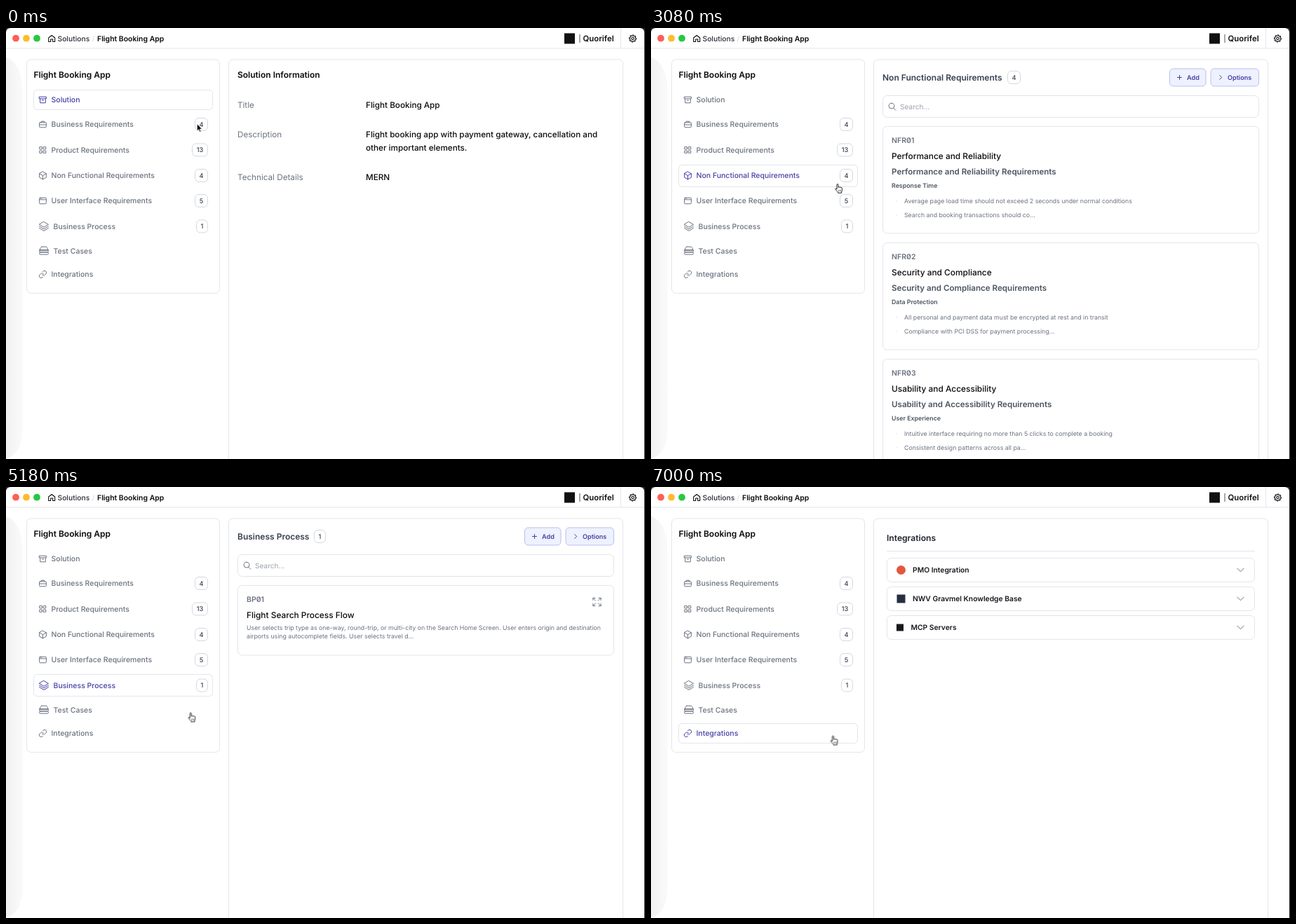
Animation, 911 px wide and 615 px high, one loop 7560 ms. Source, as an HTML page:

```html
<!DOCTYPE html>
<html lang="en">
<head>
<meta charset="utf-8">
<title>Solution requirements</title>
<style>
html, body { margin: 0; width: 100%; height: 100%; overflow: hidden; background: #222; }
svg { display: block; width: 911px; height: 615px; }
text {
  font-family: Inter, Roboto, sans-serif;
  font-feature-settings: "zero";
  text-rendering: geometricPrecision;
  white-space: pre;
}
.icon { fill: none; stroke-linecap: round; stroke-linejoin: round; }
.icon path { vector-effect: non-scaling-stroke; }

.view { visibility: hidden; animation: 7560ms step-end infinite; }
#v0 { animation-name: solution; }
#v1 { animation-name: business; }
#v2 { animation-name: product; }
#v3 { animation-name: nonfunc; }
#v4 { animation-name: ui; }
#v5 { animation-name: process; }
#v6 { animation-name: tests; }
#v7 { animation-name: integrations; }
@keyframes solution { 0% { visibility: visible } 13.888% { visibility: hidden } }
@keyframes business { 13.888% { visibility: visible } 25.925% { visibility: hidden } }
@keyframes product { 25.925% { visibility: visible } 40.74% { visibility: hidden } }
@keyframes nonfunc { 40.74% { visibility: visible } 50% { visibility: hidden } }
@keyframes ui { 50% { visibility: visible } 60.185% { visibility: hidden } }
@keyframes process { 60.185% { visibility: visible } 72.222% { visibility: hidden } }
@keyframes tests { 72.222% { visibility: visible } 92.592% { visibility: hidden } }
@keyframes integrations { 92.592%, 100% { visibility: visible } }

#plainAdd { opacity: 0; animation: tint 7560ms step-end infinite; }
@keyframes tint {
  13.888% { opacity: 1; animation-timing-function: steps(3, end) }
  16.666% { opacity: 0 }
}

#arrow { visibility: hidden; animation: arrow 7560ms step-end infinite; }
#hand { animation: hand 7560ms step-end infinite, move 7560ms step-end infinite; }
@keyframes arrow { 0% { visibility: visible } .925% { visibility: hidden } }
@keyframes hand { 0% { visibility: hidden } .925% { visibility: visible } }
@keyframes move {
  0% { transform: translate(270px, 137px) }
  .925% { transform: translate(270px, 137px); animation-timing-function: steps(3, start) }
  3.703% { transform: translate(262.7px, 137px) }
  14.814% { transform: translate(262.7px, 137px); animation-timing-function: steps(8, start) }
  22.222% { transform: translate(262px, 184px) }
  31.481% { transform: translate(262px, 184px); animation-timing-function: steps(5, start) }
  36.111% { transform: translate(262px, 222px) }
  44.444% { transform: translate(262px, 222px); animation-timing-function: steps(3, start) }
  47.222% { transform: translate(261px, 252px) }
  53.703% { transform: translate(261px, 252px); animation-timing-function: steps(3, start) }
  56.481% { transform: translate(260px, 284px) }
  65.74% { transform: translate(260px, 284px); animation-timing-function: steps(4, start) }
  69.444% { transform: translate(259.3px, 321.6px) }
  85.185% { transform: translate(259.3px, 321.6px); animation-timing-function: steps(2, start) }
  87.037% { transform: translate(259px, 325px) }
  87.962% { transform: translate(259px, 325px); animation-timing-function: steps(3, start) }
  90.74%, 100% { transform: translate(255.5px, 354.6px) }
}
</style>
</head>
<body>
<svg id="stage" viewBox="0 0 911 615" xmlns="http://www.w3.org/2000/svg"></svg>
<script>
const GREY = '#6b7280', DARK = '#374151', BLACK = '#0b0b0f', INDIGO = '#4640a5', LINE = '#e3e5ea';

const ICONS = {
  archive: 'M3 4h18v5H3zM5 9v11h14V9M10 13h4',
  bag: 'M5 7h14q2 0 2 2v9q0 2-2 2H5q-2 0-2-2V9q0-2 2-2zM8 7V4h8v3M3 13h18',
  grid: 'M4 4h6v6H4zM14 4h6v6h-6zM4 14h6v6H4zM14 14h6v6h-6z',
  cube: 'M12 2l9 5v10l-9 5-9-5V7zM3 7l9 5 9-5M12 12v10',
  pane: 'M5 4h14q2 0 2 2v12q0 2-2 2H5q-2 0-2-2V6q0-2 2-2zM3 9h18M6 6.5h.1M9 6.5h.1',
  layers: 'M12 2l10 6-10 6L2 8zM2 12l10 6 10-6M2 16l10 6 10-6',
  stack: 'M7 3h10q1 0 2 2l3 6H2l3-6q1-2 2-2zM4 10h16q2 0 2 2.5T20 15H4q-2 0-2-2.5T4 10zM4 15h16q2 0 2 2.5T20 20H4q-2 0-2-2.5T4 15z',
  link: 'M10 13a5 5 0 0 0 7.5.5l3-3a5 5 0 0 0-7-7L12 5M14 11a5 5 0 0 0-7.5-.5l-3 3a5 5 0 0 0 7 7L12 19',
  search: 'M11 3a7.5 7.5 0 1 0 0 15a7.5 7.5 0 1 0 0-15zM16.5 16.5L22 22',
  right: 'M9 5l7 7-7 7',
  down: 'M4 8l8 8 8-8',
  plus: 'M12 4v16M4 12h16',
  expand: 'M9 9L3 3M3 8V3h5M15 9l6-6M16 3h5v5M9 15l-6 6M3 16v5h5M15 15l6 6M21 16v5h-5',
  doc: 'M6 2h8l5 5v15H6zM14 2v5h5M9 13h6M9 17h6',
  clip: 'M9 3h10q1.500 0 1.500 1.500v11q0 1.500-1.500 1.500h-3M5 8h9q2 0 2 2v9q0 2-2 2H5q-2 0-2-2v-9q0-2 2-2zM7.500 8V5q0-2 2-2M6.500 15l2 2 4-4.500',
  flask: 'M8 3h8M10 3v6L3 18q-1 2.500 1.500 2.500h15q2.500 0 1.500-2.500L14 9V3M6 14.500h12',
  copy: 'M9 3h7l4 4v10H9zM9 7H5v14h10v-4',
  home: 'M3 10l9-7 9 7v11h-6v-7H9v7H3z'
};
// eight-toothed wheel around a hub
ICONS.gear = 'M12 8.5a3.5 3.5 0 1 0 0 7a3.5 3.5 0 1 0 0-7zM' + Array.from({ length: 32 }, (_, i) => {
  const r = i % 4 < 2 ? 10.5 : 8, a = i * Math.PI / 16;
  return (12 + r * Math.cos(a)).toFixed(1) + ' ' + (12 + r * Math.sin(a)).toFixed(1);
}).join('L') + 'z';

// y is the middle of the capitals
const text = (x, y, s, size = 10.5, weight = 500, color = GREY, anchor = 'start') =>
  `<text x="${x}" y="${(y + size * .36).toFixed(2)}" font-size="${size}" font-weight="${weight}" fill="${color}" text-anchor="${anchor}">${s}</text>`;
const box = (x, y, w, h, r = 6, stroke = LINE, fill = '#fff') =>
  `<rect x="${x}" y="${y}" width="${w}" height="${h}" rx="${r}" fill="${fill}" stroke="${stroke}"/>`;
const line = (x1, y1, x2, y2, color = LINE) =>
  `<path d="M${x1} ${y1}L${x2} ${y2}" stroke="${color}"/>`;
const dot = (x, y, r, fill, stroke = 'none') =>
  `<circle cx="${x}" cy="${y}" r="${r}" fill="${fill}" stroke="${stroke}"/>`;
const icon = (name, x, y, size = 13, color = GREY, width = 1) =>
  `<g class="icon" stroke="${color}" stroke-width="${width}" transform="translate(${x} ${y}) scale(${size / 24}) translate(-12 -12)"><path d="${ICONS[name]}"/></g>`;
const badge = (x, y, n, w = 19) =>
  box(x + .5, y - 9, w - 1, 18, 5.5, '#d5d8de') + text(x + w / 2, y, n, 9.2, 500, DARK, 'middle');
const small = (x, y, s) => text(x, y, s, 8.78, 400);
const strong = (y, s) => text(343, y, s, 8.8, 600, '#4b5563');

// sidebar: label, middle, icon, label x, count
const rows = [
  ['Solution', 102.5, 'archive', 64.5],
  ['Business Requirements', 137.5, 'bag', 64.5, 4],
  ['Product Requirements', 174, 'grid', 64.5, 13],
  ['Non Functional Requirements', 210.5, 'cube', 64.5, 4],
  ['User Interface Requirements', 246.5, 'pane', 64.5, 5],
  ['Business Process', 283, 'layers', 67.5, 1],
  ['Test Cases', 318, 'stack', 67.5],
  ['Integrations', 351.5, 'link', 64.5]
];
const row = ([label, y, name, x, n], on) => {
  const color = on ? INDIGO : GREY, h = n ? 31 : 28, w = n > 9 ? 23 : n === 1 ? 17 : 19;
  return (on ? box(39.5, Math.floor(y - h / 2) + .5, 255, h, 5) : '') +
    icon(name, x > 65 ? 54 : 52.5, y, x > 65 ? 15.5 : 13, color) +
    text(x, y, label, 10.5, 500, color) + (n ? badge(288 - w, y, n, w) : '');
};

const addButton = (fill, stroke, color) => box(739.5, 58, 51.5, 25, 5, stroke, fill) +
  icon('plus', 753.5, 70.5, 9, color) + text(764, 70.5, 'Add', 9.1, 600, color);
const listHead = (title, x, n, w) => text(330, 70.5, title, 12, 600, DARK) + badge(x, 70.5, n, w) +
  addButton('#eef1fe', '#b9c0ee', INDIGO) + box(798, 58, 68.5, 25, 5, '#b9c0ee', '#eef1fe') +
  icon('right', 812, 70.5, 10, INDIGO) + text(822, 70.5, 'Options', 9.1, 600, INDIGO) +
  box(330.5, 96.5, 536, 31) + icon('search', 343.5, 112, 12.5) + text(355, 112, 'Search...', 10.1, 400, '#9ca3af');
const card = (y, h, id, title) => box(330.5, y + .5, 536, h - .5) +
  text(343, y + 20.3, id, 10.5, 600) + text(343, y + 43, title, 11.9, 500, BLACK);
const two = (y, a, b) => small(343, y, a) + small(343, y + 12.2, b);

const brief = (prefix, items) => items.map(([title, a, b], i) => {
  const y = Math.round(140 + i * 112.4);
  return card(y, 100, prefix + '0' + (i + 1), title) + two(y + 61, a, b);
}).join('');

const products = [
  ['Flight Search Engine',
    'Implement a powerful search engine that allows users to search flights by entering origin, destination, dates, passenger', 'count, and class, with suppor...',
    'Search Home Screen featuring an intuitive search form with clear input fields for trip type selection, origin/destination', 'airports with autocomplete f...',
    'Leisure Traveler: Price-sensitive individuals booking vacation flights who compare multiple options before deciding, values', 'clarity on total costs inc...'],
  ['Results Filtering System',
    'Create comprehensive filtering capabilities for flight search results that enable users to refine options based on price', 'range, flight duration, depar...',
    'Results Screen with sidebar filter panel containing interactive sliders for price and duration ranges, time-of-day filters with', 'visual indicators, air...',
    'Value Seeker: Budget-conscious travelers willing to accept longer journeys or inconvenient times to save money, makes', 'heavy use of price filters. Effi...'],
  ['Booking Details', '', '', '', '', '', '']
].map(([title, a, b, c, d, e, f], i) => {
  const y = Math.round(140 + i * 223.5);
  return card(y, 211, 'PRD0' + (i + 1), title) + two(y + 61, a, b) +
    strong(y + 98.5, 'Screens:') + two(y + 116.5, c, d) + strong(y + 154.3, 'Personas:') + two(y + 172, e, f) +
    box(804.5, y + 12.5, 50, 25, 5) + text(829.3, y + 25, 'Stories', 9.05, 600, BLACK, 'middle');
}).join('');

const nonFunctional = [
  ['Performance and Reliability', 'Response Time', 'Average page load time should not exceed 2 seconds under normal conditions', 'Search and booking transactions should co...'],
  ['Security and Compliance', 'Data Protection', 'All personal and payment data must be encrypted at rest and in transit', 'Compliance with PCI DSS for payment processing...'],
  ['Usability and Accessibility', 'User Experience', 'Intuitive interface requiring no more than 5 clicks to complete a booking', 'Consistent design patterns across all pa...']
].map(([title, topic, a, b], i) => {
  const y = 140 + i * 166;
  return card(y, 153, 'NFR0' + (i + 1), title) + text(343, y + 64.5, title + ' Requirements', 11.6, 600, '#4b5563') +
    strong(y + 84.7, topic) + [a, b].map((s, k) => dot(350, y + 107 + k * 20, .7, '#d1d5db') + small(361, y + 107 + k * 20, s)).join('');
}).join('');

const stats = [
  ['Total User', 'Stories', 5, 'doc', 334, 398.5, INDIGO, '#e0e7ff', '#cdd6fb'],
  ['Stories with Test', 'Cases', 2, 'clip', 514, 576, '#b7791f', '#fef0c3', '#fbe3a0'],
  ['Total Test Cases', 'Present', 26, 'flask', 695, 756.5, '#2f8f66', '#d1fae5', '#b3f0d2']
].map(([a, b, n, name, x, tx, color, fill, edge]) => box(x + .5, 227.5, 168, 92) +
  dot(x + 33.5, 273, 18, fill, edge) + icon(name, x + 33.5, 273, 17, color, 1.2) +
  text(tx, 251, a, 10.25, 500, color) + text(tx, 266, b, 10.25, 500, color) + text(tx, 290, n, 22.5, 700, BLACK)).join('');

const stories = [
  ['Flight Search Interface', 'Ability to input search criteria for flights In order to start searching for appropriate flights As a', 'leisure or business traveler I want an intuitiv...', 25],
  ['Flight Results Display', 'Ability to view and navigate flight search results In order to compare flight options and make', 'informed decisions As a leisure or business traveler I...', 1]
].map(([title, a, b, n], i) => {
  const y = 338 + i * 151;
  return box(334.5, y + .5, 528, 141) + text(353, y + 20.5, 'US' + (i + 1), 10.2, 600, DARK) +
    text(353, y + 43, title, 12.1, 600, '#1f2430') + text(353, y + 63.3, a, 10.33, 400) + text(353, y + 78.3, b, 10.33, 400) +
    line(349, y + 95.5, 851, y + 95.5, '#eef0f3') + dot(362, y + 116.5, 9, '#d1fae5') +
    icon('clip', 362, y + 116.5, 11, '#2f8f66') + text(377, y + 116.5, n + ' test cases', 9, 600, BLACK) +
    box(823.5, y + 13.5, 26, 20, 5) + icon('copy', 836.5, y + 23.5, 14, BLACK, 1.2);
}).join('');

const field = (y, label, value) => text(330, y, label, 11.7, 400) + text(513, y, value, 11.7, 500, BLACK);
const connector = (y, label, x, mark) => box(336.5, y + .5, 524, 34) + mark +
  text(x, y + 17.5, label, 10.3, 600, '#16181d') + icon('down', 840.5, y + 17.5, 14);

const views = [
  text(330, 67, 'Solution Information', 12, 600, BLACK) + field(109.5, 'Title', 'Flight Booking App') +
    field(152, 'Description', 'Flight booking app with payment gateway, cancellation and') +
    field(170.3, '', 'other important elements.') + field(212.5, 'Technical Details', 'MERN'),

  listHead('Business Requirements', 473.5, 4) + '<g id="plainAdd">' + addButton('#fff', LINE, BLACK) + '</g>' + brief('BRD', [
    ['Seamless Flight Booking Process', 'Implement an intuitive and efficient flight booking system that allows users to search, compare, and book flights across', 'multiple airlines with minimal steps. The system should pro...'],
    ['Secure Payment Gateway Integration', 'Integrate a robust, multi-currency payment gateway system supporting various payment methods including credit/debit', 'cards, digital wallets, and bank transfers with industry-standar...'],
    ['Flexible Booking Management', 'Develop comprehensive booking management capabilities allowing users to view, modify, and cancel reservations with', 'minimal friction. The system should automatically calculate and d...'],
    ['Travel Insights Dashboard', 'Create a data-driven insights dashboard for business stakeholders to monitor key performance indicators including', 'booking volumes, revenue streams, popular routes, seasonal trends,...']
  ]),

  listHead('Product Requirements', 466, 13, 23) + products,

  listHead('Non Functional Requirements', 508, 4) + nonFunctional,

  listHead('User Interface Requirements', 503, 5) + brief('UIR', [
    ['Flight Search Screen', 'Design a clean search screen with clear input fields for origin, destination, travel dates, and passenger count, with the', 'main search action always visible. The layout should ad...'],
    ['Search Results Layout', 'Present flight results in a consistent card layout showing price, duration, stops, and airline, with sorting and filtering', 'controls placed beside the list of res...'],
    ['Booking and Payment Flow', 'Provide a step-by-step booking flow with a progress indicator, inline validation, and a persistent price summary that is', 'visible through to the final confirm...'],
    ['Booking Management Screen', 'Display upcoming and past bookings with clear status labels and direct actions to view, modify, or cancel a reservation', 'with a transparent refund summ...'],
    ['Responsive Design', '', '']
  ]),

  listHead('Business Process', 439, 1, 17) + brief('BP', [
    ['Flight Search Process Flow', 'User selects trip type as one-way, round-trip, or multi-city on the Search Home Screen. User enters origin and destination', 'airports using autocomplete fields. User selects travel d...']
  ]) + icon('expand', 842.5, 164, 15),

  box(318, 45.5, 561.5, 600, 6, '#e6e8ec') + text(334, 77.7, 'Test Cases', 13.6, 600, '#1f2430') +
    text(334, 104, 'User Stories', 12, 500, DARK) + badge(411.5, 104, 5) +
    small(334, 125.5, 'Each user story contains its own test cases. View or create test cases by choosing a user story.') +
    text(334, 151.5, 'Flight Search Engine', 10.33, 400) +
    box(334.5, 183.5, 172, 31) + icon('search', 347.5, 199, 12.5) + text(359, 199, 'Search user stories...', 10.15, 400, '#9ca3af') +
    box(516.5, 184.5, 346, 30, 5, '#d3d6dc') + text(526, 200, 'PRD01 - Flight Search Engine', 10.25, 500, '#1f2430') + icon('down', 848, 200, 12) +
    stats + stories,

  text(336, 73, 'Integrations', 12.1, 600, '#1f2430') + line(336, 91.5, 861, 91.5) +
    connector(101, 'PMO Integration', 373, dot(356.5, 118.5, 6.5, '#e2583e')) +
    connector(142, 'NWV Gravmel Knowledge Base', 373, '<rect x="350.5" y="153.5" width="12" height="12" fill="#252f3e"/>') +
    connector(183, 'MCP Servers', 370.5, '<rect x="350" y="195.5" width="10" height="10" fill="#18181b"/>')
];

const frame = `<defs><linearGradient id="shade"><stop stop-color="#f0f1f2"/><stop offset=".5" stop-color="#f6f6f7"/><stop offset="1" stop-color="#fafafa"/></linearGradient></defs>
  <path d="M0 615V7Q0 0 7 0H903Q910 0 910 7V615z" fill="#fff"/>
  <path d="M0 42C14 46 23 62 24 92V568C23 596 16 608 4 613L0 614z" fill="url(#shade)"/>` +
  line(0, 29, 910, 29) + line(876.5, 0, 876.5, 29) +
  dot(14, 14.7, 4.9, '#fe5f57') + dot(29, 14.7, 4.9, '#febc2e') + dot(44, 14.7, 4.9, '#28c840') +
  icon('home', 65.2, 15, 12, BLACK, 1.1) + text(73.5, 15, 'Solutions', 10.3, 500, '#2b2f36') +
  text(122.5, 15, '/', 10, 400, '#d1d5db') + text(130, 15, 'Flight Booking App', 10.45, 600, BLACK) +
  '<rect x="796" y="7.5" width="15" height="15" fill="#111"/>' + line(818, 9, 818, 21, '#555') +
  text(822.5, 15, 'Quorifel', 11.4, 600, '#111') + icon('gear', 893.5, 15, 11.5, BLACK, 1.1) +
  box(29.5, 45, 275, 333.5) + box(317.5, 45, 562, 600) +
  text(39.5, 67, 'Flight Booking App', 12, 600, BLACK) + rows.map(r => row(r)).join('');

const cursors = `<path id="arrow" transform="translate(272.3 136.8)" d="M0 0V10.2L2.4 8 4 11.6 5.7 10.9 4.1 7.4H7.3z" fill="#000" stroke="#fff" stroke-width=".8"/>
  <g id="hand"><path d="M3 8.2V1.6Q3 .6 4 .6T5 1.6V5.4Q5 4.7 5.9 4.7T6.9 5.6Q7 5 7.8 5T8.8 6Q9 5.5 9.6 5.5T10.4 6.5V9.5Q10.4 11 9.6 12V13.4H4.6V12.3Q3 10.8 1 8.3Q.5 7.3 1.3 7T3 8.2z" fill="#fff" stroke="#111" stroke-width=".9" stroke-linejoin="round"/>
  <path d="M5.6 8.8v2.6M7.1 8.8v2.6M8.6 8.8v2.6" stroke="#333" stroke-width=".6"/></g>`;

document.getElementById('stage').innerHTML = frame +
  views.map((v, i) => `<g class="view" id="v${i}">${row(rows[i], true)}${v}</g>`).join('') + cursors;
</script>
</body>
</html>
```
